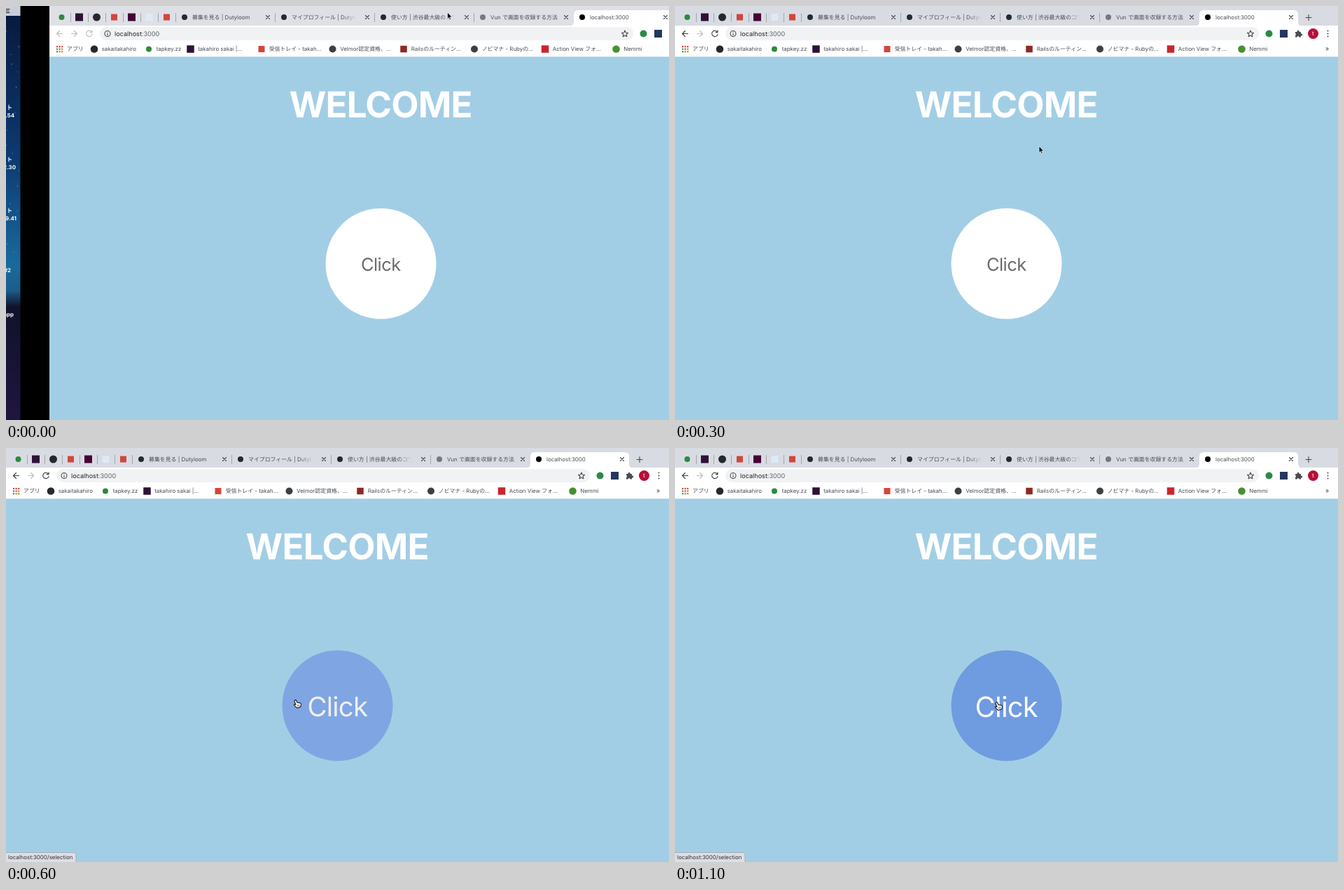
An HTML page that plays this animation: 947 by 591 pixels, repeating every 1.2 s.

```html
<!DOCTYPE html>
<html lang="ja">
<head>
<meta charset="utf-8">
<title>Welcome</title>
<style>
  html, body { margin: 0; width: 100%; height: 100%; overflow: hidden; background: #000; }
  svg { display: block; width: 947px; height: 591px; }
  text { font: 7.9px Inter, "Noto Sans CJK JP", "Noto Sans CJK", sans-serif; text-rendering: geometricPrecision; }
  .line { fill: none; stroke-width: 1.1; stroke-linecap: round; stroke-linejoin: round; }
  #desk text { font-weight: 700; fill: #fff; text-anchor: end; }
  #welcome { font-size: 51px; font-weight: 700; letter-spacing: -.016em; fill: #fff; text-anchor: middle; }
  #click { letter-spacing: -.02em; text-anchor: middle; }
</style>
</head>
<body>
<svg id="stage" viewBox="0 0 947 591">
  <defs>
    <linearGradient id="sky" x2="0" y2="1">
      <stop offset="0" stop-color="#081a40"/>
      <stop offset=".35" stop-color="#0d3a70"/>
      <stop offset=".62" stop-color="#1a6a9e"/>
      <stop offset=".68" stop-color="#1c5c88"/>
      <stop offset=".72" stop-color="#10122c"/>
      <stop offset="1" stop-color="#20153f"/>
    </linearGradient>
    <linearGradient id="fade">
      <stop offset="0" stop-color="currentColor" stop-opacity="0"/>
      <stop offset=".6" stop-color="currentColor"/>
    </linearGradient>
  </defs>
  <g id="desk"></g>
  <g id="win">
    <g id="strip"></g>
    <g id="bar"></g>
    <rect y="72.4" width="947" height="519" fill="#a2cee5"/>
    <text id="welcome" x="473" y="158.7">WELCOME</text>
    <circle id="disc" cx="473.5" cy="367.8" r="79"/>
    <text id="click" x="473.3">Click</text>
    <g id="status">
      <path d="M-1 592V577.5H97q3 0 3 3V592" fill="#dcdfe6" stroke="#9aa5b1" stroke-width=".8"/>
      <text x="3" y="587" fill="#2c2f33">localhost:3000/selection</text>
    </g>
  </g>
  <path id="arrow" d="M0 0v9.4l2.1-1.9 1.4 3.2 1.6-.7-1.4-3.1h2.9z" fill="#000" stroke="#fff" stroke-width=".7"/>
  <g id="hand" class="line">
    <path d="M-2.3-5.6q1-1 1.8.4l1.6 3 4 .6q1.4.4 1.3 2l-.6 3.6-5 1.6-4-3.6q-.9-1.6.6-1.7l1.6.5-2-4.6q-.2-1.1.7-1.8z" fill="#fff" stroke="#111"/>
    <path d="M1.2 1.2l.7 2M3.2.8l.5 2" stroke="#111" stroke-width=".7"/>
  </g>
</svg>
<script>
const $ = id => document.getElementById(id);
const label = (x, y, s, fill = '#484b50', size = 7.9) =>
  `<text x="${x}" y="${y}" fill="${fill}" style="font-size:${size}px">${s}</text>`;
const dot = (x, y, r, fill) => `<circle cx="${x}" cy="${y}" r="${r}" fill="${fill}"/>`;
const box = (x, y, s, fill) =>
  `<rect x="${x - s / 2}" y="${y - s / 2}" width="${s}" height="${s}" fill="${fill}"/>`;
const line = (d, stroke = '#44474b') => `<path class="line" d="${d}" stroke="${stroke}"/>`;
const GREEN = '#2c8a3c', PLUM = '#2e1236', INK = '#24292e', RED = '#d5453b';

function buildDesk() {
  let s = '<rect y="14" width="20.5" height="577" fill="url(#sky)"/>' +
    '<rect width="20.5" height="14" fill="#c9cedb"/>' + line('M0 4.5H5M0 7H4M0 9.5H5', '#222');
  for (let i = 0; i < 26; i++)
    s += dot(i * 7.3 % 20, 22 + i * 47 % 340, .35 + i % 3 * .15, '#7fa6d0');
  const names = [[9, 148, 'ット'], [12, 158.5, '.54'], [9, 222, 'ット'], [14, 232.5, '2.30'],
    [9, 295, 'ット'], [15, 305.5, '9.41'], [7, 379.5, '#2'], [11, 443, 'app']];
  $('desk').innerHTML = s + names.map(n => label(...n, '#fff')).join('');
}

function buildStrip() {
  let s = '<rect width="947" height="29" fill="currentColor"/>';
  const pins = [[dot, 8, GREEN], [box, 11, PLUM], [dot, 11, INK], [box, 9, RED],
    [box, 11, '#470137'], [box, 10, '#dfe9f5'], [box, 9, RED]];
  pins.forEach(([draw, size, fill], i) => {
    s += draw(17.5 + i * 25, 16, draw === dot ? size / 2 : size, fill) +
      `<path d="M${30.5 + i * 25} 10V23" stroke="#94989e" stroke-width=".8"/>`;
  });
  s += '<path d="M743 28.5q6 0 6-6V12q0-6 6-6H884q6 0 6 6V22.5q0 6 6 6z" fill="#fff"/>';
  const tabs = [['募集を見る | Dutyloom', INK], ['マイプロフィール | Dutyloom', INK],
    ['使い方 | 渋谷最大級のコワー', INK], ['Vun で画面を収録する方法', '#75797e'], ['localhost:3000', '#000']];
  tabs.forEach(([title, fill], i) => {
    const x = 180.5 + i * 142;
    s += dot(x + 12.5, 16, 4, fill) + label(x + 23.5, 19, title);
    if (i == 1 || i == 2) s += `<rect x="${x + 96}" y="8" width="33" height="16" fill="url(#fade)"/>`;
    s += line(`M${x + 129} 13.5l5 5m0-5l-5 5`);
    if (i < 3) s += `<path d="M${x + 142} 10V23" stroke="#94989e" stroke-width=".8"/>`;
  });
  $('strip').innerHTML = s + line('M901 16.5h8m-4-4v8');
}

function buildBar() {
  let s = '<rect y="28" width="947" height="45" fill="#fff"/>' +
    '<rect x="72" y="30" width="762" height="19" rx="9.5" fill="#f0f2f4"/>' +
    '<g id="nav" class="line"><path d="M18.5 39.5h-8m4-4l-4 4 4 4M60.4 37a4.2 4.2 0 1 0 .6 3.4M61 34.8v2.8h-2.8"/>' +
    '<path d="M932.5 35.5v.1m0 3.9v.1m0 3.9v.1" stroke-width="1.8"/></g>' +
    line('M31.5 39.5h8m-4-4l4 4-4 4', '#b9bcc0') +
    line('M87 39.5a4 4 0 1 0-8 0a4 4 0 1 0 8 0M83 39.2v2.2M83 37.3v.1') +
    label(93, 42.7, 'localhost<tspan fill="#5f6368">:3000</tspan>', '#202124', 9.1) +
    line('M822 35l1.3 3 3.2.3-2.4 2.2.7 3.2-2.8-1.7-2.8 1.7.7-3.2-2.4-2.2 3.2-.3z') +
    dot(848.5, 39.5, 5, '#2b8a45') + box(869.5, 39.5, 11, '#25365f') +
    '<path d="M886 37h2.6a1.6 1.6 0 1 1 3 0h2.4v2.5a1.6 1.6 0 1 1 0 3V44.5h-2.5a1.5 1.5 0 0 0-3 0H886v-2.6a1.5 1.5 0 0 0 0-2.8z" fill="#494c50"/>' +
    dot(911.5, 39.5, 7.5, '#b80f38') + label(910, 42.3, 't', '#fff', 8);
  const hues = [RED, RED, RED, '#3f9357', RED, '#b8862c', '#3f9357', '#b8862c', '#b8862c'];
  hues.forEach((fill, i) => s += box(11 + i % 3 * 3.6, 58 + (i / 3 | 0) * 3.6, 2.2, fill));
  s += label(25, 64.3, 'アプリ');
  const marks = [[64, dot, 5.3, INK, 'sakaitakahiro'], [142, dot, 4, GREEN, 'tapkey.zz'],
    [201.5, box, 10.5, PLUM, 'takahiro sakai |...'], [303, box, 9, RED, '受信トレイ - takah...'],
    [404.5, dot, 5, '#3c4043', 'Velmor認定資格、...'], [506, box, 9.5, '#8c2a22', 'Railsのルーティン...'],
    [607, dot, 5, '#3c4043', 'ノビマナ - Rubyの...'], [708, box, 10.5, '#c8272d', 'Action View フォ...'],
    [809.5, dot, 5.3, '#46912f', 'Nemmi']];
  for (const [x, draw, size, fill, name] of marks)
    s += draw(x, 61.5, size, fill) + label(x + 10.7, 64.3, name);
  $('bar').innerHTML = s + label(929, 64.3, '»', '#3c4043', 9);
}

const STEP = 100, STEPS = 12;
const shift = [62, 18];                       // the window slides in from the right
const hover = [0, 0, 0, 0, .01, .5, .89];     // progress of the button's transition
const glide = [415, 418, 447, 458, 460, 461]; // hand x from 600 ms on
const mix = (a, b, p) => a + (b - a) * p;
const rgb = (from, to, p) => `rgb(${from.map((v, i) => Math.round(mix(v, to[i], p)))})`;
const show = (id, on) => $(id).setAttribute('display', on ? 'inline' : 'none');
const move = (id, x, y) => $(id).setAttribute('transform', `translate(${x} ${y})`);

function draw(now) {
  const n = Math.floor(now / STEP) % STEPS;
  const p = hover[n] ?? 1, active = n > 2, size = mix(25.4, 40, p);
  show('desk', n == 0);
  move('win', shift[n] || 0, 0);
  $('stage').style.color = active ? '#d9dbe2' : '#dee0e6';
  $('nav').setAttribute('stroke', active ? '#3c4043' : '#b9bcc0');
  $('disc').setAttribute('fill', rgb([255, 255, 255], [111, 155, 224], p));
  $('click').setAttribute('fill', rgb([107, 107, 107], [255, 255, 255], p));
  $('click').style.fontSize = size + 'px';
  $('click').setAttribute('y', 369 + size * .3635);
  show('status', n > 4);
  $('status').setAttribute('opacity', n == 5 ? .5 : 1);
  show('arrow', n < 4);
  show('hand', n > 3);
  if (n < 4) move('arrow', n < 3 ? 630.5 : 520, n < 3 ? 9 : 200);
  else {
    const x = glide[Math.max(0, n - 6)];
    move('hand', x, 365.6 + (x - 415) * .07);
  }
}

buildDesk();
buildStrip();
buildBar();
const start = performance.now();
function tick() {
  draw(performance.now() - start);
  requestAnimationFrame(tick);
}
tick();
</script>
</body>
</html>
```
